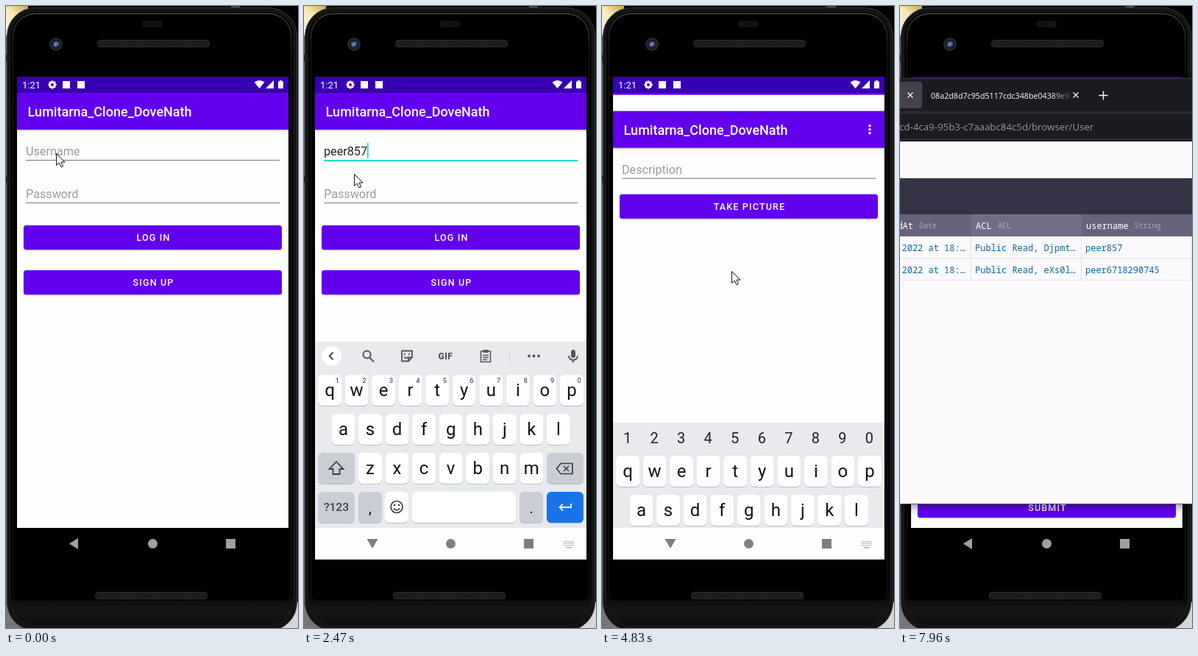
Animation, 397 px wide and 845 px high, one loop 8 s. Source, as an HTML page with a canvas:

```html
<!DOCTYPE html>
<html lang="en">
<head>
<meta charset="utf-8">
<title>Phone login</title>
<style>
html, body { margin: 0; width: 100%; height: 100%; overflow: hidden; background: #000; }
canvas { display: block; width: 397px; height: 845px; }
</style>
</head>
<body>
<canvas id="stage" width="397" height="845"></canvas>
<script>
const LOOP = 8000;
const ctx = document.getElementById('stage').getContext('2d');
const PURPLE = '#6200ee', TEAL = '#03dac5', ICON = '#54575b';
const ROBOTO = 'Roboto, sans-serif', SANS = '"Open Sans", sans-serif', MONO = '"Noto Sans Mono", monospace';
const TITLE = 'Lumitarna_Clone_DoveNath', USER = 'peer857';

const clamp = v => Math.max(0, Math.min(1, v));
const ease = (t, a, b) => { const p = clamp((t - a) / (b - a)); return p * p * (3 - 2 * p); };

function rect(x, y, w, h, fill) {
  ctx.fillStyle = fill;
  ctx.fillRect(x, y, w, h);
}
function round(x, y, w, h, r, fill, line) {
  ctx.beginPath();
  ctx.roundRect(x, y, w, h, r);
  if (fill) { ctx.fillStyle = fill; ctx.fill(); }
  if (line) { ctx.strokeStyle = line; ctx.lineWidth = 1; ctx.stroke(); }
}
function disc(x, y, r, fill) {
  ctx.beginPath();
  ctx.arc(x, y, r, 0, 7);
  ctx.fillStyle = fill;
  ctx.fill();
}
function icon(d, x, y, color, width = 0) {
  const path = new Path2D(d);
  ctx.save();
  ctx.translate(x, y);
  if (width) {
    ctx.strokeStyle = color;
    ctx.lineWidth = width;
    ctx.stroke(path);
  } else {
    ctx.fillStyle = color;
    ctx.fill(path);
  }
  ctx.restore();
}
function text(s, x, y, font, color, align = 'left', spacing = 0) {
  ctx.font = font;
  ctx.fillStyle = color;
  ctx.textAlign = align;
  ctx.letterSpacing = spacing + 'px';
  ctx.fillText(s, x, y);
}
function gradient(x0, y0, x1, y1, ...colors) {
  const g = ctx.createLinearGradient(x0, y0, x1, y1);
  colors.forEach((c, i) => g.addColorStop(i / (colors.length - 1), c));
  return g;
}
function shadow(color, blur, dy) {
  ctx.shadowColor = color;
  ctx.shadowBlur = blur;
  ctx.shadowOffsetY = dy;
}

// Phone body

function grille(x, y) {
  round(x + .5, y + .5, 152, 9, 4, '#1b1b1b', '#333331');
  for (let i = 4; i < 150; i += 3) {
    rect(x + i, y + 3, 1, 1, '#363634');
    rect(x + i + 1, y + 6, 1, 1, '#30302e');
  }
}

function phone() {
  rect(0, 0, 397, 845, '#000');
  rect(0, 0, 30, 40, gradient(0, 30, 28, 0, '#f4f0e4', '#fbe9b4', '#c9a85c'));
  rect(0, 40, 2, 805, '#5a5a5a');
  rect(0, 815, 24, 30, '#777');
  rect(370, 810, 27, 35, '#d6d6d6');
  rect(306, 0, 12, 3, '#444');
  round(1.5, 2.5, 394, 846, 38, '#141414', '#383838');
  rect(0, 66, 3, 9, '#222');
  rect(0, 231, 3, 9, '#222');
  round(5.5, 7.5, 386, 834, 34, gradient(0, 800, 0, 842, '#050505', '#171717', '#0c0c0c'), '#1c1c1c');
  round(9.5, 10.5, 378, 798, [30, 30, 8, 8], '#000', gradient(0, 10, 0, 100, '#666', '#1c1c1c', '#141414'));
  round(185, 20, 28, 9, 4, '#131313');
  grille(124, 46);
  grille(121, 796);
  disc(68, 52, 9, '#29292b');
  disc(68, 52, 6.5, '#181a26');
  disc(68, 52, 4, gradient(65, 49, 71, 56, '#3a4473', '#5c6aa8', '#20263f'));
  disc(67.5, 52, 1.3, '#8d9ad0');
}

// App screens

function statusBar() {
  rect(15, 96, 369, 22, '#3700b3');
  text('1:21', 22, 112, '13px ' + ROBOTO, '#fff');
  for (let i = 0; i < 8; i++) {
    const a = i * Math.PI / 4;
    disc(63 + 4.4 * Math.cos(a), 107 + 4.4 * Math.sin(a), 1.4, '#fff');
  }
  icon('M3.3 0A3.3 3.3 0 1 1-3.3 0A3.3 3.3 0 1 1 3.3 0', 63, 107, '#fff', 2.6);
  rect(77, 102, 10, 10, '#fff');
  rect(97, 102, 10, 10, '#fff');
  icon('M0 11L-7 2.5Q0-2.5 7 2.5Z', 344.5, 101, '#fff');
  icon('M0 11H11V0Z', 353, 101, '#fff');
  icon('M0 1.5H2V0H5V1.5H7V11H0Z', 370, 101, '#fff');
}

function appBar(menu) {
  shadow('rgba(0,0,0,.3)', 3, 1);
  rect(15, 118, 369, 50, PURPLE);
  shadow('transparent', 0, 0);
  text(TITLE, 29.5, 150, '500 18px ' + ROBOTO, '#fff');
  if (menu) for (const y of [138, 143, 148]) disc(364, y, 1.8, '#fff');
}

function button(label, y, h = 33) {
  shadow('rgba(0,0,0,.3)', 2, 1);
  round(24, y, 351, h, 3.5, PURPLE);
  shadow('transparent', 0, 0);
  text(label, 200.5, y + h / 2 + 4.5, '500 12.6px ' + ROBOTO, '#fff', 'center', 1.13);
}

function field(hint, value, base, focused) {
  text(value || hint, 27, base, '16.2px ' + ROBOTO, value ? '#212121' : '#9b9b9b');
  if (focused) rect(27, base + 6, 345, 2, TEAL);
  else rect(27, base + 6, 345, 1, '#757575');
}

const caret = (x, base) => rect(x, base - 17, 1.5, 21, TEAL);

function typedUser(t) {
  const times = [1000, 1190, 1280, 1280, 1830, 1920, 2010];
  return USER.slice(0, times.filter(s => t >= s).length);
}

function password(t, focused) {
  const count = [3020, 3110, 3200].filter(s => t >= s).length;
  field('Password', count ? ' ' : '', 261, focused);
  for (let i = 0; i < count; i++) {
    if (i === count - 1 && t < 3570) text('123'[i], 27.5 + i * 5.6, 261, '16.2px ' + ROBOTO, '#212121');
    else disc(30 + i * 5.6, 255, 2, '#212121');
  }
  if (focused && t < 3570) caret(27 + count * 5.6 + (count ? 4 : 0), 261);
}

function login(t) {
  rect(15, 96, 369, 613, '#fefefe');
  appBar(false);
  const onUser = t >= 370 && t < 2650, onPass = t >= 2650;
  const name = typedUser(t);
  field('Username', name, 203, onUser);
  ctx.font = '16.2px ' + ROBOTO;
  const width = ctx.measureText(name).width;
  if (name && t < 2190) {
    const lined = t >= 1280 && t < 1460 ? name.slice(0, 3) : name;
    rect(27, 204, ctx.measureText(lined).width, 1, '#212121');
  }
  if (onUser) caret(27 + width, 203);
  password(t, onPass);
  button('LOG IN', 298);
  button('SIGN UP', 359);
}

function compose() {
  rect(15, 96, 369, 613, '#fefefe');
  appBar(true);
  field('Description', '', 203, false);
  button('TAKE PICTURE', 231);
  button('SUBMIT', 668, 27);
}

function navBar(light) {
  const c = light ? '#7f7f7f' : '#a0a0a0';
  rect(15, 709, 369, 43, light ? '#fefefe' : '#000');
  icon(light ? 'M-7.5-6H7.5L0 7Z' : 'M-7 .5L5-7V8Z', 93, 730, c);
  disc(199.5, 730.5, 6.5, c);
  rect(299, 724, 13, 13, c);
  if (!light) return;
  for (let r = 0; r < 3; r++)
    for (let i = 0; i < 6; i++) rect(353 + i * 2.4, 727 + r * 2.5, 1.5, 1.5, '#b0b0b0');
  rect(356, 735, 8, 1.5, '#b0b0b0');
}

// Keyboard

const PITCH = 36.55, GREY_KEY = '#cacdd4';

function key(x, y, w, fill = '#fff', label = '', font = '24px ') {
  round(x, y + 1, w, 42, 6, '#b9bcc1');
  round(x, y, w, 42, 6, fill);
  if (label) text(label, x + w / 2, y + 28.5, font + ROBOTO, '#111', 'center');
}

function keyRow(letters, x, y, digits) {
  [...letters].forEach((ch, i) => {
    const kx = x + PITCH * i;
    key(kx, y, 32, '#fff', ch);
    if (digits) text((i + 1) % 10, kx + 29, y + 10.5, '500 9.5px ' + ROBOTO, ICON, 'right');
  });
}

function chevron(right) {
  disc(37.5, 475.5, 13.5, '#fff');
  icon(right ? 'M-2-5L3 0L-2 5' : 'M2-5L-3 0L2 5', 37.5, 475.5, '#3c4043', 1.8);
}

function mic() {
  round(363, 467, 6, 11, 3, ICON);
  icon('M-6 0A6 6 0 0 0 6 0M0 6V9.5', 366, 475, ICON, 1.8);
}

function toolbar() {
  chevron(false);
  icon('M3 -2A5 5 0 1 1-7-2A5 5 0 1 1 3-2M1.5 2L7.5 8', 87.5, 475.5, ICON, 2);
  icon('M-7-7H7V2L2 7H-7ZM7 2H2V7M-4 1Q-1 5 2 1', 140, 475.5, ICON, 1.8);
  disc(137, 473, 1.2, ICON);
  disc(143, 473, 1.2, ICON);
  text('GIF', 192.5, 479.5, '900 12px ' + ROBOTO, ICON, 'center', .5);
  icon('M-6.5-6.5H6.5V8H-6.5ZM-4-1H4M-4 2H4M-4 5H2', 247, 475.5, ICON, 1.6);
  rect(243.5, 467, 7, 4, ICON);
  rect(279, 466, 1, 20, '#d0d2d6');
  for (const x of [306, 312.5, 319]) disc(x, 475.5, 1.9, ICON);
  mic();
}

function suggestions(t) {
  const words = t < 1190 ? ['p', 'people', 'please']
    : t < 1280 ? ['pe', 'people', 'per']
    : t < 1460 ? ['pee', 'peer', 'peers']
    : t < 1830 ? ['peers', 'peer', 'peering']
    : ['', typedUser(t), ''];
  chevron(true);
  words.forEach((w, i) => text(w, 92 + i * 104, 481, '16px ' + ROBOTO, '#202124', 'center'));
  rect(143, 466, 1, 20, '#d0d2d6');
  rect(248, 466, 1, 20, '#d0d2d6');
  mic();
}

function keyboard(t) {
  const secret = t >= 2740;
  rect(15, 456, 369, 253, '#e8eaed');
  if (secret) {
    for (let i = 0; i < 10; i++) text((i + 1) % 10, 34.5 + PITCH * i, 484, '20px ' + ROBOTO, '#202124', 'center');
  } else if (t >= 1000 && t < 2470) suggestions(t);
  else toolbar();

  keyRow('qwertyuiop', 19, 501, !secret);
  keyRow('asdfghjkl', 37.5, 554, false);
  key(19, 607, 50, GREY_KEY);
  icon('M0-9L9.5 1H4.5V8H-4.5V1H-9.5Z', 44, 628, '#3c4043', 1.8);
  keyRow('zxcvbnm', 74, 607, false);
  key(330, 607, 50, GREY_KEY);
  icon('M-11 0L-5.5-7H10.5V7H-5.5ZM-1.5-3.5L5.5 3.5M5.5-3.5L-1.5 3.5', 354.5, 628.5, '#3c4043', 1.7);

  key(19, 660, 50, GREY_KEY);
  text('?123', 44, 686, '500 15.5px ' + ROBOTO, '#3c4043', 'center');
  key(74, 660, 31.5, GREY_KEY, ',', '21px ');
  if (!secret) {
    key(110, 660, 32, '#fff');
    icon('M8 0A8 8 0 1 1-8 0A8 8 0 1 1 8 0M-4.2 2Q0 7 4.2 2', 126, 680.5, '#3c4043', 1.7);
    disc(123, 678, 1.3, '#3c4043');
    disc(129, 678, 1.3, '#3c4043');
  }
  const left = secret ? 110 : 147;
  key(left, 660, 288 - left, '#fff');
  key(293, 660, 32, GREY_KEY, '.', '21px ');
  key(330, 660, 50, '#1a73e8');
  icon(secret ? 'M-8 0L-3 5L8-6' : 'M8-5V0H-7M-3-4.5L-7.5 0L-3 4.5', 355, 681, '#fff', 1.8);
}

function screen(t) {
  ctx.save();
  ctx.beginPath();
  ctx.rect(15, 96, 369, 656);
  ctx.clip();
  const opened = ease(t, 4700, 4960);
  const shown = t < 4740 ? ease(t, 460, 700) : 1 - ease(t, 4740, 4960);
  if (opened < 1) login(t);
  if (opened > 0) {
    ctx.save();
    ctx.globalAlpha = ease(t, 4700, 4830);
    ctx.translate(0, 50 * (1 - opened));
    compose();
    ctx.restore();
  }
  statusBar();
  if (shown > 0) {
    ctx.save();
    ctx.translate(0, 296 * (1 - shown));
    keyboard(t);
    ctx.restore();
  }
  navBar(shown > 0);
  ctx.restore();
}

// Browser window

function browser() {
  shadow('rgba(0,0,0,.5)', 14, 2);
  rect(-20, 98, 437, 579, '#1c1b22');
  shadow('transparent', 0, 0);
  rect(0, 98, 397, 1, '#3a3943');
  round(-20, 103, 50, 36, 4, '#42414d');
  const cross = 'M-3.5-3.5L3.5 3.5M3.5-3.5L-3.5 3.5';
  icon(cross, 14, 121, '#fbfbfe', 1.2);
  text('08a2d8d7c95d5117cdc348be04389e9', 42, 125.5, '10.7px ' + SANS, gradient(205, 0, 234, 0, '#fbfbfe', 'rgba(251,251,254,.1)'));
  icon(cross, 239, 121, '#fbfbfe', 1.2);
  icon('M-6 0H6M0-6V6', 276.5, 121.5, '#fbfbfe', 1.4);
  rect(0, 143, 397, 40, '#2b2a33');
  rect(0, 147, 397, 33, '#1c1b22');
  text('cd-4ca9-95b3-c7aaabc84c5d/browser/User', -1, 169, '13.3px ' + SANS, '#98979f');
  rect(0, 183, 397, 1, '#0c0c0d');

  rect(0, 184, 397, 492, '#fbf9fb');
  rect(0, 234, 397, 49, '#353446');
  rect(0, 283, 397, 30, '#66637a');
  rect(97, 283, 150, 30, '#716f88');
  const head = (name, type, x, tx) => {
    text(name, x, 303, '12px ' + MONO, '#fff');
    text(type, tx, 302, '10px ' + MONO, '#aaa8bb');
  };
  head('dAt', 'Date', -3.6, 26);
  head('ACL', 'ACL', 103, 133);
  head('username', 'String', 253, 318.5);
  const rows = [['Djpmt', USER], ['eXs0l', 'peer6718290745']];
  rows.forEach(([id, name], i) => {
    const y = 333 + i * 30;
    const cell = (s, x) => text(s, x, y, '12px ' + MONO, '#0e69a1');
    cell('2022 at 18:…', 2.5);
    cell('Public Read, ' + id + '…', 102);
    cell(name, 252);
    rect(0, y + 9, 397, 1, '#e3e2ea');
  });
  for (const x of [96, 246, 396]) rect(x, 313, 1, 60, '#e3e2ea');
  rect(0, 676, 397, 1, '#55545c');
}

// Pointer: time, x, y; null x means off stage

const POINTER = [
  [0, 68, 200], [2469, 68, 200], [2470, 68, 228], [2540, 68, 228], [2650, 68, 245],
  [3570, 68, 245], [4280, 176, 360], [5479, 176, 360], [5480, 178, 352], [5589, 178, 352],
  [5590, 213, 375], [5680, null], [5860, 387, 747], [6220, null],
  [6410, 305, 333], [6500, 305, 333], [6800, 296, 342], [7150, 311, 338],
  [7240, 311, 339], [7900, 28, 342], [7960, null]
];

function pointer(t) {
  const i = POINTER.findLastIndex(p => t >= p[0]);
  const [t0, x0, y0] = POINTER[i];
  if (x0 === null) return;
  let [t1, x1, y1] = POINTER[i + 1];
  if (x1 === null) [x1, y1] = t0 === 5860 ? [316, 825] : [x0, y0];
  const p = (t - t0) / (t1 - t0);
  const arrow = 'M0 0V16L3.8 12.6L6.4 18.4L9 17.3L6.5 11.6H11.5Z';
  const x = Math.round(x0 + (x1 - x0) * p) + .5, y = Math.round(y0 + (y1 - y0) * p) + .5;
  icon(arrow, x, y, '#fff');
  icon(arrow, x, y, '#111', 1);
}

function draw(now) {
  const t = now % LOOP;
  phone();
  screen(t);
  if (t >= 6410) browser();
  pointer(t);
  requestAnimationFrame(draw);
}
requestAnimationFrame(draw);
</script>
</body>
</html>
```
